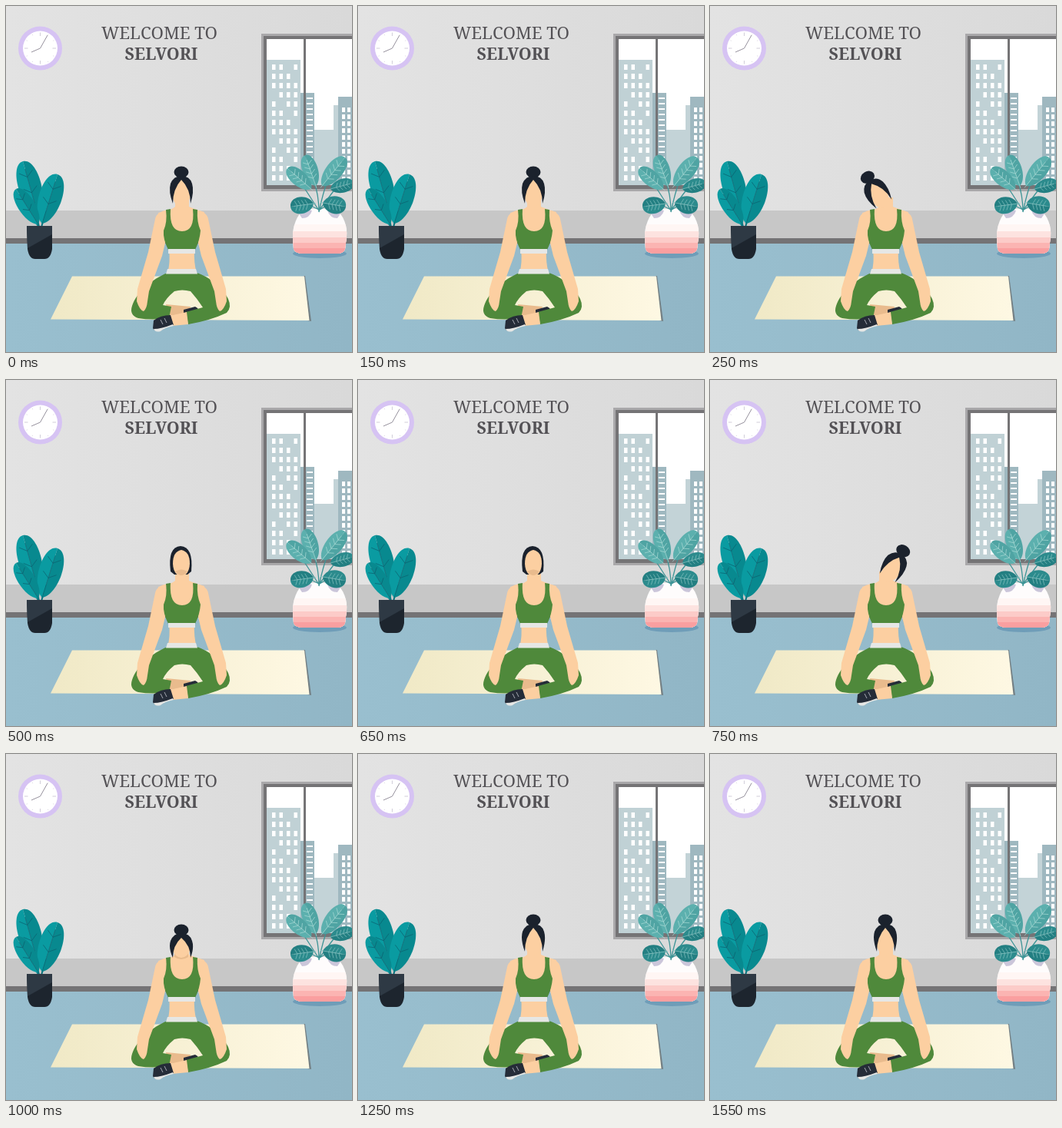
Animation of 450x450 px, one loop 1.75 s. Source, as an HTML page:

```html
<!DOCTYPE html>
<html lang="en">
<head>
<meta charset="utf-8">
<title>Seated neck stretch</title>
<style>
  html, body { margin: 0; width: 100%; height: 100%; overflow: hidden; background: #dcdcdd; }
  svg { display: block; width: 100vw; height: 100vh; }
  text { font-family: "Roboto Slab", "Noto Serif", serif; text-anchor: middle; fill: #535155; }
  .skin { fill: #fccfa1; }
  .shade { fill: #e9bb8d; }
  .hair { fill: #1b222d; }
  .cloth { fill: #4f893b; }
  .trim { fill: #e6e7e5; }
  .shoe { fill: #252c38; }
</style>
</head>
<body>
<svg viewBox="0 0 450 450" xmlns="http://www.w3.org/2000/svg">
  <defs>
    <linearGradient id="wall"><stop stop-color="#e3e3e3"/><stop offset="1" stop-color="#d9d9d9"/></linearGradient>
    <linearGradient id="floor"><stop stop-color="#99bfcf"/><stop offset="1" stop-color="#91b6c6"/></linearGradient>
    <linearGradient id="mat"><stop stop-color="#f0e9c6"/><stop offset="1" stop-color="#fef8e3"/></linearGradient>
    <clipPath id="vase"><path d="M388 264H428C440 272 444 287 443 300L441 316Q439 322 430 322H387Q376 322 374 316L373 300C373 286 378 272 388 264Z"/></clipPath>
  </defs>

  <rect width="450" height="450" fill="url(#wall)"/>
  <rect y="266" width="450" height="37" fill="#c7c7c7"/>
  <rect y="302" width="450" height="8" fill="#747375"/>
  <rect y="309" width="450" height="141" fill="url(#floor)"/>

  <text x="199.500" y="42.500" font-size="22.200" font-weight="400">WELCOME TO</text>
  <text x="202" y="69.500" font-size="21.500" font-weight="700">SELVORI</text>

  <g id="clock">
    <circle cx="44.500" cy="55" r="28.500" fill="#d6c3f3"/>
    <circle cx="44.500" cy="55" r="22.500" fill="#fff"/>
    <path d="M33 60L44.500 55L54 38" fill="none" stroke="#96919d" stroke-width="1"/>
  </g>

  <g id="window">
    <rect x="332" y="36" width="118" height="205" fill="#a9a8aa"/>
    <rect x="335" y="39" width="115" height="199" fill="#757476"/>
    <rect x="339" y="43" width="111" height="190" fill="#fff"/>
    <rect x="339" y="70" width="44" height="163" fill="#c0d1d5"/>
    <path d="M401 233V161H426V129H434V233Z" fill="#c3d3d7"/>
    <rect x="383" y="113" width="18" height="120" fill="#9fb8c0"/>
    <rect x="432" y="118" width="18" height="115" fill="#9fb8c0"/>
    <g id="panes" fill="#fff"></g>
    <rect x="387" y="39" width="3" height="199" fill="#757476"/>
  </g>

  <g id="leftPlant"></g>
  <path d="M27 286H60V316Q58 329 50 329H38Q30 329 28 316Z" fill="#1d252e"/>
  <path d="M27 286H60V297L28 315Z" fill="#2e3944"/>

  <ellipse cx="408" cy="322" rx="35" ry="6" fill="#6f9db8"/>
  <g id="vaseBands" clip-path="url(#vase)"></g>
  <path d="M379 267Q386 262 398 266Q395 276 385 276ZM437 267Q430 262 418 266Q421 276 431 276Z" fill="#cbc6da"/>
  <g id="rightPlant"></g>

  <path d="M387 351H389L397 410L392 409Z" fill="#737f83"/>
  <path d="M86 351.500H388L394.500 409L58 407.500Z" fill="url(#mat)"/>

  <g id="legs">
    <path class="shade" d="M208 388L240 391L237 400L211 403Z"/>
    <path class="shoe" d="M231 395L246 391Q253 394 249 399L231 400Z"/>
    <path class="cloth" d="M210 347H248C264 352 282 366 289 381Q294 392 287 399Q266 409 237 414L234 398L256 392Q249 381 240 371Q229 368 219 371Q208 380 204 389L215 391L212 406Q190 409 172 406Q160 402 164 390C170 372 190 355 210 347Z"/>
    <path class="skin" d="M213 403L235 398L237 414L216 416Z"/>
    <path class="shoe" d="M192 409Q201 402 214 402L218 415Q208 417 202 422Q194 425 191 419Z"/>
    <path class="trim" d="M192 420Q202 420 217 414L218 416Q207 418 201 423Q194 425 192 420Z"/>
    <path d="M201 408L204 414M206 406L209 412" stroke="#a5a9b2" fill="none"/>
  </g>

  <g id="body">
    <path id="arm" class="skin" d="M211 265Q196 267 194 277L185 320L171 368L170 384Q174 396 179 397Q183 394 184 384L186 371L203 325L210 296Z"/>
    <use href="#arm" transform="matrix(-1 0 0 1 457 0)"/>
    <path class="skin" d="M220 249H238V261Q247 265 258 268L252 300L245 317Q244 333 248 348H210Q214 333 212 317L206 300L198 269Q215 266 220 261Z"/>
    <path class="cloth" d="M208 265L214 264Q212 293 229 293Q246 293 243 264L249 265Q248 281 253 292Q252 305 246 317H211Q204 303 205 292Q210 281 208 265Z"/>
    <path class="trim" d="M211 316H246V322H211Z"/>
    <path class="trim" d="M210 342H247L249 348.500H208Z"/>
  </g>

  <g id="heads">
    <g data-pose="upright">
      <path class="skin" d="M228 224Q217 232 216 246Q218 259 228 262Q238 259 240 246Q239 232 228 224Z"/>
      <ellipse class="hair" cx="228" cy="216" rx="9.500" ry="7.500"/>
      <path class="hair" d="M217 257Q211 241 214 231Q218 221 228 221Q239 221 242 231Q245 241 240 257Q240 238 228 226Q217 238 217 257Z"/>
    </g>
    <g data-pose="back">
      <path class="hair" d="M214 249Q210 217 227 216Q244 217 241 249L236 253H219Z"/>
      <path class="skin" d="M228 221Q217 223 217 239Q218 254 228 255Q238 254 239 239Q239 223 228 221Z"/>
      <path class="shade" d="M220 249Q228 244 236 249Q232 254 228 254Q224 254 220 249Z"/>
    </g>
    <g data-pose="down">
      <path class="shade" d="M219 256H237V264Q228 270 219 264Z"/>
      <path class="skin" d="M228 237Q217 241 216 253Q219 264 228 265Q237 264 240 253Q239 241 228 237Z"/>
      <ellipse class="hair" cx="228" cy="229" rx="9.500" ry="7.500"/>
      <path class="hair" d="M217 265Q211 252 214 243Q218 233 228 233Q239 233 242 243Q245 252 240 265Q240 249 228 239Q217 249 217 265Z"/>
    </g>
  </g>
</svg>
<script>
const NS = "http://www.w3.org/2000/svg";
const $ = id => document.getElementById(id);

function add(parent, tag, attrs) {
  const el = document.createElementNS(NS, tag);
  for (const key in attrs) el.setAttribute(key, attrs[key]);
  return parent.appendChild(el);
}

function drawClockTicks() {
  for (let i = 0; i < 12; i++) {
    const a = i * Math.PI / 6, c = Math.cos(a), s = Math.sin(a), r = i % 3 ? 19.5 : 16;
    add($("clock"), "line", {
      x1: 44.5 + r * c, y1: 55 + r * s, x2: 44.5 + 20.5 * c, y2: 55 + 20.5 * s,
      stroke: "#c6c0d0", "stroke-width": 0.8
    });
  }
}

// Some windows are left dark by a simple repeating rule.
function drawPanes(x, y, cols, rows, dx, dy, width, height, skip = Infinity) {
  for (let row = 0; row < rows; row++)
    for (let col = 0; col < cols; col++)
      if ((row * 3 + col * 2 + 1) % skip)
        add($("panes"), "rect", { x: x + col * dx, y: y + row * dy, width, height });
}

// A leaf grows from its base to its tip, with paired side veins.
function leaf(parent, bx, by, tx, ty, halfWidth, fill, shade, vein, veinPairs) {
  const length = Math.hypot(tx - bx, ty - by);
  const angle = Math.atan2(ty - by, tx - bx) * 180 / Math.PI;
  const w = halfWidth / 0.75, near = length * 0.15, far = length;
  const g = add(parent, "g", { transform: `translate(${bx} ${by}) rotate(${angle})` });
  const half = side => `M0 0C${near} ${side * w} ${far} ${side * w} ${length} 0Z`;
  add(g, "path", { d: half(-1), fill });
  add(g, "path", { d: half(1), fill: shade });
  let d = `M-3 0H${length * 0.85}`;
  for (let i = 1; i <= veinPairs; i++) {
    const x = length * (0.1 + i * 0.6 / veinPairs), y = halfWidth * 0.6;
    d += `M${x} 0l${length * 0.1} ${y}M${x} 0l${length * 0.1} ${-y}`;
  }
  add(g, "path", { d, fill: "none", stroke: vein, "stroke-width": 0.7 });
}

function drawPlants() {
  const left = $("leftPlant"), right = $("rightPlant");
  const teal = ["#0a9ba1", "#08898f", "#0b6371", 2];
  add(left, "path", { d: "M43 288L38 262M46 288L52 266M43 288L30 268", stroke: "#0d7f88", "stroke-width": 2, fill: "none" });
  leaf(left, 41, 270, 22, 202, 15, ...teal);
  leaf(left, 47, 283, 67, 219, 15, ...teal);
  leaf(left, 42, 284, 13, 238, 11, ...teal);

  add(right, "path", { d: "M407 268Q407 246 400 226M407 268Q412 243 420 222M407 266L385 232M407 266L428 238M407 265L397 260M408 265L416 260", stroke: "#3d9496", "stroke-width": 1.3, fill: "none" });
  const light = ["#5cb0ae", "#4fa4a3", "#a5d8d3", 4], dark = ["#2c8b8d", "#237f82", "#83c1bf", 4];
  leaf(right, 403, 234, 389, 194, 10, ...light);
  leaf(right, 411, 234, 441, 197, 11, ...light);
  leaf(right, 397, 238, 366, 211, 10, ...light);
  leaf(right, 422, 238, 452, 230, 9, ...dark);
  leaf(right, 400, 257, 370, 261, 11, ...dark);
  leaf(right, 412, 256, 442, 261, 11.5, ...dark);
}

function drawVase() {
  const bands = [[258, "#fefcfc"], [284, "#fff6f4"], [293, "#fde3e0"], [301, "#fccbc8"], [308, "#fbb4b2"], [315, "#fa9fa0"]];
  for (const [y, fill] of bands)
    add($("vaseBands"), "rect", { x: 370, y, width: 76, height: 70, fill });
}

// Side tilts reuse the upright head, turned about the base of the neck.
const KEYS = [
  { at: 0, pose: "upright", tilt: 0 },
  { at: 250, pose: "upright", tilt: -31 },
  { at: 500, pose: "back", tilt: 0 },
  { at: 750, pose: "upright", tilt: 31 },
  { at: 1000, pose: "down", tilt: 0 },
  { at: 1250, pose: "upright", tilt: 0 }
];
const LOOP = 1750;
const heads = [...$("heads").children];

function render(time) {
  const t = time % LOOP;
  const key = KEYS.filter(k => k.at <= t).pop();
  for (const head of heads) {
    head.setAttribute("display", head.dataset.pose === key.pose ? "inline" : "none");
    head.setAttribute("transform", `rotate(${key.tilt} 228.5 261)`);
  }
}

drawClockTicks();
drawPanes(346, 76, 4, 13, 9.5, 12, 4.5, 7, 5);
drawPanes(391, 119, 1, 16, 9, 7, 8, 2);
drawPanes(437, 132, 2, 11, 7, 9, 4, 6);
drawPlants();
drawVase();

const start = performance.now();
function tick() {
  render(performance.now() - start);
  requestAnimationFrame(tick);
}
tick();
</script>
</body>
</html>
```
